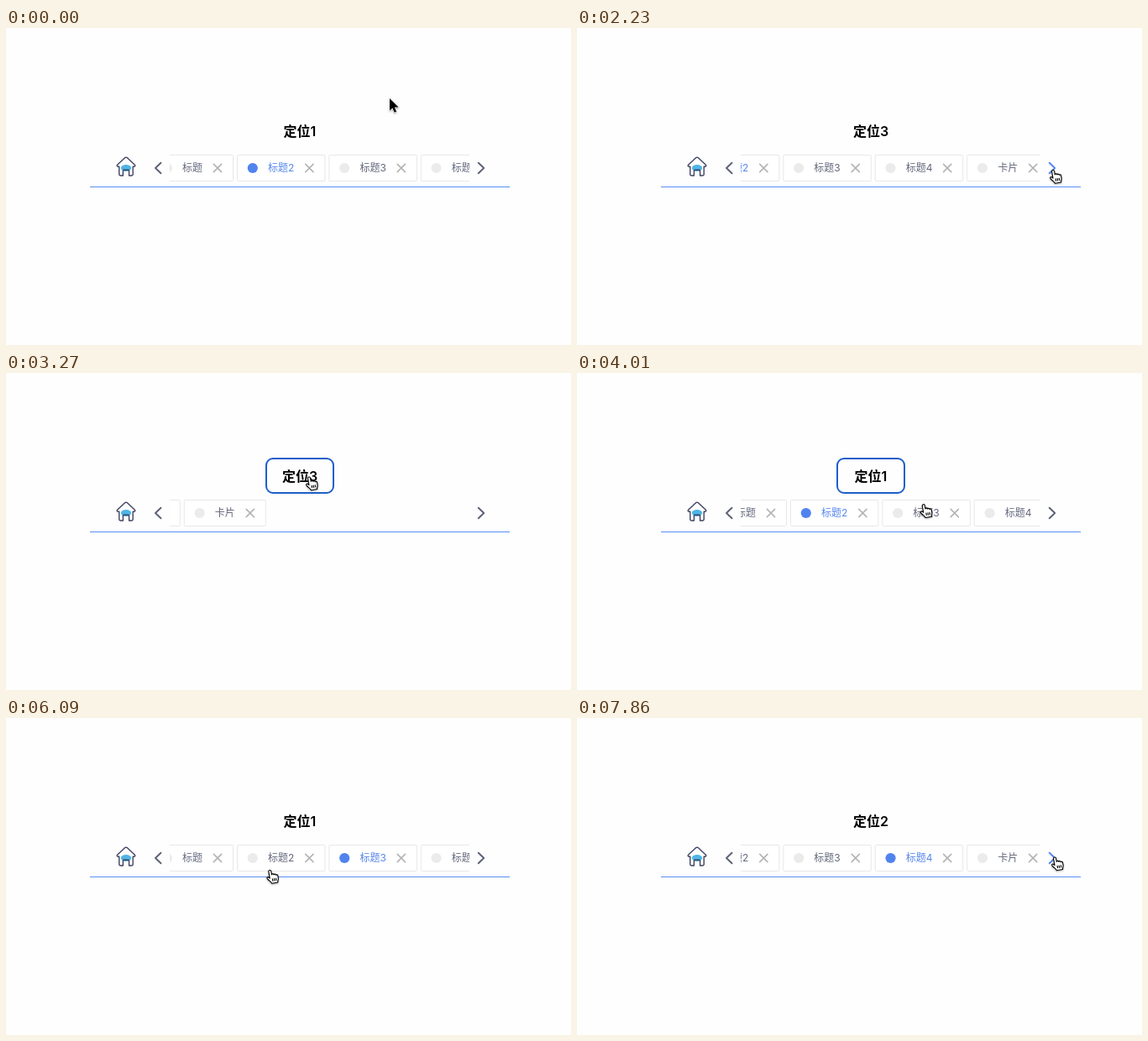
Write an HTML page that moves like this. It is 673 px wide and 378 px high and loops after 8000 ms.

```html
<!DOCTYPE html>
<html lang="zh-CN">
<head>
<meta charset="utf-8">
<title>标签栏</title>
<style>
  html, body { margin: 0; width: 100%; height: 100%; overflow: hidden; background: #fefefe; }
  svg { display: block; font-family: Inter, "Noto Sans CJK SC", "Noto Sans CJK", sans-serif; }
  path { fill: none; stroke-linecap: round; stroke-linejoin: round; }
  #title { font-size: 16px; font-weight: 600; text-anchor: middle; }
  #home path { stroke: #3d4260; stroke-width: 1.4; }
  .chevron { stroke: #5c6175; stroke-width: 1.9; }
  .chevron.hover { stroke: #5585ec; }
  .tab rect { fill: #fff; stroke: #e8e8e8; }
  .tab circle { fill: #ebebeb; }
  .tab text { fill: #63677c; font-size: 12px; }
  .tab path { stroke: #b3b3b3; stroke-width: 1.6; }
  .tab.active circle { fill: #5083ee; }
  .tab.active text { fill: #5585ec; }
  .tab.closing path { stroke: #5083ee; }
  #arrow { fill: #000; stroke: #fff; stroke-width: 1.1; paint-order: stroke; }
  #hand path { fill: #fff; stroke: #000; stroke-width: 1.2; }
  #cursor { filter: drop-shadow(0 1px 1px #0005); }
</style>
</head>
<body>
<svg width="673" height="378" viewBox="0 0 673 378">
  <clipPath id="view"><rect x="195" y="145" width="357" height="42"/></clipPath>
  <rect id="ring" x="310" y="102" width="80" height="41" rx="8" fill="none"/>
  <text id="title" x="350" y="129"></text>
  <g id="home">
    <ellipse cx="143" cy="167" rx="6.2" ry="4" fill="#4fb4e6"/>
    <path d="M134.8 165.2H133Q131.6 164.6 132.6 163.3L141.8 154.6Q143 153.6 144.2 154.6L153.4 163.3Q154.4 164.6 153 165.2H151.2V174.6Q151.2 176 149.8 176H146.6V170.4Q146.6 169.2 145.4 169.2H140.6Q139.4 169.2 139.4 170.4V176H136.2Q134.8 176 134.8 174.6Z"/>
  </g>
  <path class="chevron" d="M184.5 160.7L178 167L184.5 173.3"/>
  <path class="chevron" id="next" d="M562.7 160.7L569.2 167L562.7 173.3"/>
  <g clip-path="url(#view)"><g id="tabs"></g></g>
  <rect x="100" y="189" width="500" height="1" fill="#588ff5"/>
  <g id="cursor">
    <path id="arrow" d="M0 0V14.6L3.4 11.4L5.7 16.7L8.1 15.7L5.8 10.5H10.6Z"/>
    <g id="hand" transform="rotate(-10) scale(.94)">
      <path d="M-1.8 1.6C-1.8-.6 1.4-.6 1.4 1.6V6c.3-1.2 2.6-1 2.7.5 .6-1 2.4-.7 2.5.9 .8-.7 2.2-.2 2.2 1.3V12c0 1.5-1.3 2.5-1.5 5H-.3C-.8 14.8-3.6 12.6-5 10c-.8-1.6.8-2.6 2-1.4L-1.8 10Z"/>
      <path d="M1.4 11.5V14M3.6 11.5V14M5.8 11.5V14"/>
    </g>
  </g>
</svg>
<script>
const LOOP = 8000, TICK = 148.1, PAGE = 195.7, SCROLL_TICKS = 4.7;
const $ = id => document.getElementById(id);

// Tabs are laid out from the first one's left edge at rest.
let left = 173;
const tabs = ['标题', '标题2', '标题3', '标题4', '卡片'].map(label => {
  const width = label.length > 2 ? 105.4 : 98;
  const node = document.createElementNS('http://www.w3.org/2000/svg', 'g');
  node.innerHTML = `<rect x=".5" y="151.5" width="${width - 1}" height="31" rx="1"/>
    <circle cx="18.8" cy="167" r="6.1"/><text x="37" y="171.2">${label}</text>
    <path d="M${width - 23.6} 162.4l9.2 9.2m0-9.2l-9.2 9.2"/>`;
  node.setAttribute('transform', `translate(${left} 0)`);
  $('tabs').append(node);
  const closeX = left + width - 19;
  left += width + 4;
  return { node, closeX };
});

// The story, in ticks
const pages = [[0, 1], [12, 2], [15, 3], [23, 1], [50, 2]];
const selections = [[0, 1], [30, 2], [45, 3]];
const moves = [
  { from: 0, to: 4, x: 422, y: 184 },
  { from: 4, to: 5, x: 427, y: 171 },
  { from: 7, to: 10.7, x: 567, y: 169.5 },
  { from: 15, to: 20, x: 361, y: 124 },
  { from: 24, to: 29, x: 440, y: 174 },
  { from: 30, to: 35.5, x: 533, y: 171 },
  { from: 37, to: 40, x: 244, y: 188 },
  { from: 40, to: 43, x: 525, y: 162 },
  { from: 45, to: 46, x: 575, y: 161 },
  { from: 47, to: 48, x: 569, y: 166 }
];

const progress = (tick, from, to) => Math.max(0, Math.min(1, (tick - from) / (to - from)));
const ease = p => (1 - Math.cos(Math.PI * p)) / 2;
const latest = (steps, tick) => steps.findLast(([start]) => start <= tick)[1];

function pointerAt(tick) {
  let x = 457, y = 84;
  for (const move of moves) {
    const p = ease(progress(tick, move.from, move.to));
    x += (move.x - x) * p;
    y += (move.y - y) * p;
  }
  return { x, y };
}

// A new page takes over from wherever the previous scroll has got to.
function scrollAt(tick) {
  let position = 0;
  pages.forEach(([start, page], i) => {
    const until = Math.min(tick, pages[i + 1]?.[0] ?? tick);
    const p = ease(progress(until, start, start + SCROLL_TICKS));
    position += ((page - 1) * PAGE - position) * p;
  });
  return position;
}

const within = ({ x, y }, x0, y0, x1, y1) => x >= x0 && x <= x1 && y >= y0 && y <= y1;

function render(time) {
  const tick = Math.min(53, Math.floor(time % LOOP / TICK));
  const pointer = pointerAt(tick), before = pointerAt(tick - 1);
  const scroll = scrollAt(tick), active = latest(selections, tick);
  const onButton = within(pointer, 309, 101, 391, 144);
  const onNext = within(pointer, 558, 158, 572, 176);
  const onTab = within(pointer, 195, 151, 552, 183);
  const focused = tick >= 22 && tick < 30;

  $('title').textContent = '定位' + latest(pages, tick);
  $('ring').setAttribute('stroke', focused ? '#1d5fc9' : onButton ? '#646cff' : 'none');
  $('ring').setAttribute('stroke-width', focused ? 2 : 1);
  $('next').classList.toggle('hover', onNext);

  $('tabs').setAttribute('transform', `translate(${-scroll} 0)`);
  tabs.forEach(({ node, closeX }, i) => {
    const x = closeX - scroll;
    // The close colour fades late, so it outlasts the hover by one tick.
    const closing = [pointer, before].some(p => within(p, x - 8, 159, x + 8, 175));
    node.setAttribute('class', 'tab');
    node.classList.toggle('active', i === active);
    node.classList.toggle('closing', closing);
  });

  const pointing = onButton || onNext || onTab;
  $('cursor').setAttribute('transform', `translate(${pointer.x} ${pointer.y})`);
  $('arrow').style.display = pointing ? 'none' : '';
  $('hand').style.display = pointing ? '' : 'none';
}

function loop() {
  render(performance.now());
  requestAnimationFrame(loop);
}
loop();
</script>
</body>
</html>
```
